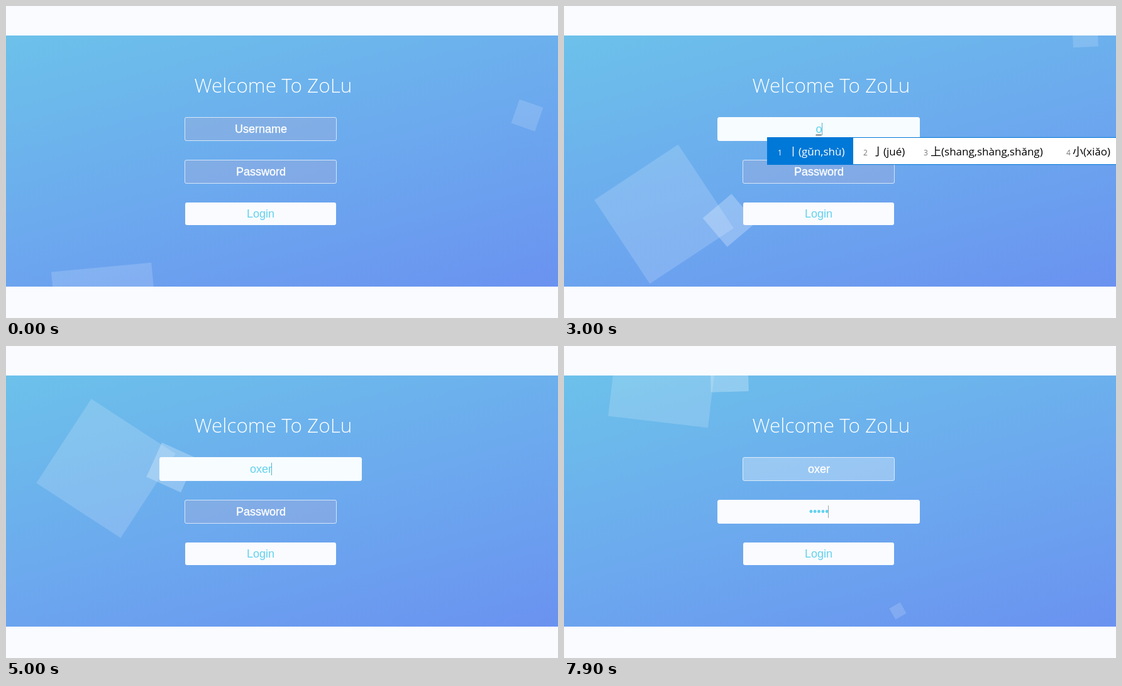
Animation, 878 px wide and 497 px high, one loop 8000 ms. Source, as an HTML page:

```html
<!DOCTYPE html>
<html lang="en">
<head>
<meta charset="utf-8">
<title>Login</title>
<style>
html, body { margin: 0; width: 100%; height: 100%; overflow: hidden; background: #f9fbff; }
svg { position: absolute; left: 0; top: 0; }
#panel { position: absolute; left: 0; top: 47px; width: 878px; height: 400px;
  background: linear-gradient(165deg, #6cc1ea, #6caaee 50%, #6a92f0); }
text { font: 18px "Liberation Sans", Arial, sans-serif; text-anchor: middle; white-space: pre; }
.title { font: 300 31.5px "Open Sans", "Noto Sans", sans-serif; fill: #fff; }
.ime text { font: 17px "Open Sans", "Noto Sans", "Noto Sans CJK SC", sans-serif; text-anchor: start; }
.ime .num { font-size: 12px; fill: #777; }
.ime .on { fill: #fff; }
</style>
</head>
<body>
<div id="panel"></div>
<svg width="878" height="497">
  <clipPath id="clip"><rect y="47" width="878" height="400"/></clipPath>
  <g id="bubbles" clip-path="url(#clip)" fill="#fff"></g>
  <text class="title" x="425" y="138">Welcome To ZoLu</text>
  <g id="fields"></g>
  <rect x="285" y="313" width="240" height="36" rx="3" fill="#f9fbff"/>
  <text x="405" y="337" fill="#62d2ee">Login</text>
  <svg id="ime" class="ime" x="323" y="209" height="44"></svg>
</svg>
<script>
const LOOP = 8000, STEP = 100;
const NAME = 'oxer';
const ACCENT = '#62d2ee';
const $ = id => document.getElementById(id);

function add(parent, tag, attrs, text = '') {
  const el = document.createElementNS('http://www.w3.org/2000/svg', tag);
  set(el, attrs);
  el.textContent = text;
  return parent.appendChild(el);
}

function set(el, attrs) {
  for (const key in attrs) el.setAttribute(key, attrs[key]);
}

// CSS "ease": cubic-bezier(.25, .1, .25, 1), solved by bisection
function ease(x) {
  if (x <= 0) return 0;
  if (x >= 1) return 1;
  const curve = (s, a, b) => 3 * (1 - s) ** 2 * s * a + 3 * (1 - s) * s * s * b + s ** 3;
  let lo = 0, hi = 1;
  for (let i = 0; i < 30; i++) {
    const mid = (lo + hi) / 2;
    if (curve(mid, .25, .25) < x) lo = mid; else hi = mid;
  }
  return curve(lo, .1, 1);
}

const fade = (t, start) => ease((t - start) / 250);
const lerp = (a, b, k) => a + (b - a) * k;
const mix = (a, b, k) => a.map((v, i) => lerp(v, b[i], k));
const countPast = (t, times) => times.filter(v => t >= v).length;

// Rising squares: centre x, size, opacity, start and duration in seconds
const bubbles = [
  { x: 159, size: 160, alpha: .16, start: -1.4, span: 22.8 },
  { x: 263, size: 60, alpha: .25, start: -1.36, span: 20 },
  { x: 829, size: 40, alpha: .15, start: -7.78, span: 22.8 },
  { x: 531, size: 20, alpha: .16, start: 1.78, span: 34 }
];
for (const b of bubbles) {
  b.el = add($('bubbles'), 'rect', {
    x: -b.size / 2, y: -b.size / 2, width: b.size, height: b.size, opacity: b.alpha
  });
}

function drawBubble(b, t) {
  const k = ease((t / 1000 - b.start) / b.span);
  const y = 607 - b.size / 2 - 700 * k;
  set(b.el, { transform: `translate(${b.x} ${y}) rotate(${-120 * k})` });
}

const IDLE = [170, 172, 211, .33], HOVER = [255, 255, 255, .3];

function makeField(y, label, bright, caretColor) {
  const g = add($('fields'), 'g', {});
  return {
    y, label, bright,
    box: add(g, 'rect', { y: y + .5, height: 37, rx: 2.5, stroke: '#fff' }),
    text: add(g, 'text', { x: 405.5, y: y + 25, 'stroke-width': .35 }),
    caret: add(g, 'rect', { y: y + 9, width: 1, height: 20, fill: caretColor })
  };
}

function drawField(f, { value, hover, focus, caret }) {
  const width = lerp(241, 321, focus);
  const [r, g, b, a] = mix(mix(IDLE, HOVER, hover), f.bright, focus);
  set(f.box, {
    x: 405 - width / 2, width, fill: `rgba(${r},${g},${b},${a})`,
    'stroke-opacity': lerp(.7, 0.9, focus)
  });
  const color = focus > .5 && value ? ACCENT : '#fff';
  f.text.textContent = value || (focus > .5 ? '' : f.label);
  set(f.text, { fill: color, stroke: color === '#fff' ? color : 'none' });
  const half = value ? f.text.getComputedTextLength() / 2 : 0;
  set(f.caret, { x: Math.floor(405 + half), visibility: caret ? 'visible' : 'hidden' });
}

const nameField = makeField(177, 'Username', [247, 252, 255, 1], '#4fb4cc');
const passField = makeField(245, 'Password', [249, 251, 255, 1], '#9aa6b0');
const underline = add($('fields'), 'rect', { x: 401, y: 205, width: 9, height: 1, fill: '#222' });

const imeFrame = add($('ime'), 'rect', { x: .5, y: .5, height: 43, fill: '#fff', stroke: '#0078d7' });
add($('ime'), 'rect', { width: 137, height: 44, fill: '#0078d7' });
[
  [17, 33, '丨(gǔn,shù)'],
  [153, 168, '亅(jué)'],
  [249, 260, '上(shang,shàng,shǎng)'],
  [476, 486, '小(xiǎo)']
].forEach(([numX, x, word], i) => {
  const on = i ? '' : ' on';
  add($('ime'), 'text', { class: 'num' + on, x: numX, y: 29 }, i + 1);
  add($('ime'), 'text', { class: on, x, y: 29 }, word);
});

const FOCUS_NAME = 1600, FOCUS_PASS = 5300;
const nameKeys = [2900, 3300, 3500, 3700];
const passKeys = [6500, 6800, 7100, 7400, 7700];

// The caret is lit for half a second after focus or a key, then blinks
function blink(t, events) {
  const last = Math.max(...events.filter(v => v <= t));
  return (t - last) % 1000 < 500;
}

function draw(t) {
  bubbles.forEach(b => drawBubble(b, t));
  const toPass = fade(t, FOCUS_PASS);
  const letters = countPast(t, nameKeys);
  drawField(nameField, {
    value: NAME.slice(0, letters),
    hover: fade(t, 500),
    focus: fade(t, FOCUS_NAME) - toPass,
    caret: t >= FOCUS_NAME && t < FOCUS_PASS && blink(t, [FOCUS_NAME, ...nameKeys, 4000])
  });
  drawField(passField, {
    value: '•'.repeat(countPast(t, passKeys)),
    hover: 0,
    focus: toPass,
    caret: t >= FOCUS_PASS && blink(t, [FOCUS_PASS, ...passKeys])
  });

  const composing = t >= nameKeys[0] && t < 4000;
  const half = nameField.text.getComputedTextLength() / 2;
  set(underline, { x: 405.5 - half, width: Math.max(0, 2 * half - 1), visibility: composing ? 'visible' : 'hidden' });
  const imeWidth = letters > 1 ? 495 : 555;
  set($('ime'), { width: imeWidth, visibility: composing ? 'visible' : 'hidden' });
  set(imeFrame, { width: letters > 1 ? 494 : 600 });
}

const begin = performance.now();
function tick() {
  const t = (performance.now() - begin) % LOOP;
  draw(Math.floor(t / STEP) * STEP);
  requestAnimationFrame(tick);
}
tick();
</script>
</body>
</html>
```
